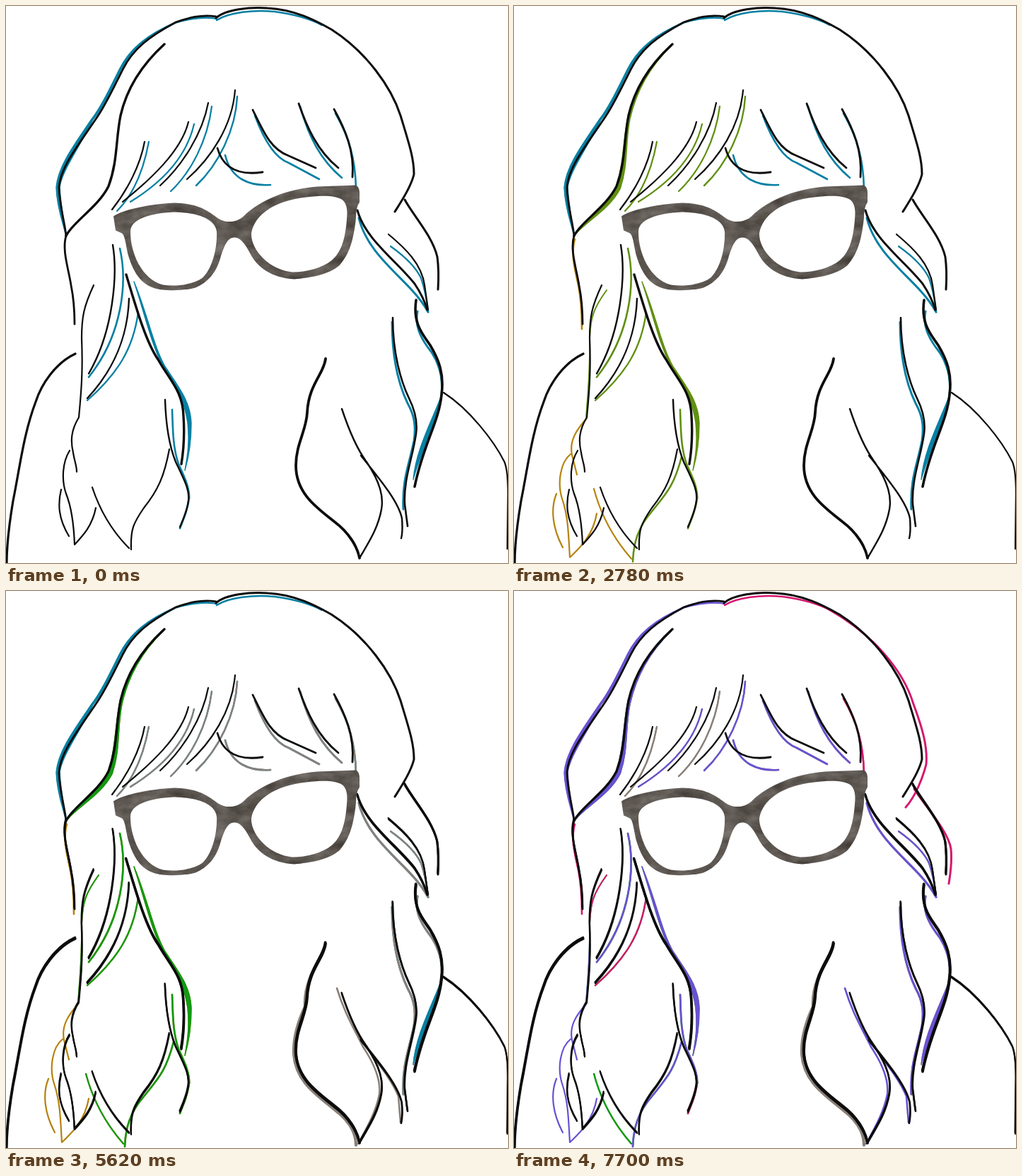
An HTML page without scripts for the animation above (8000 ms loop, 710 px wide and 788 px high).

```html
<!DOCTYPE html>
<html lang="en">
<head>
<meta charset="utf-8">
<title>Hair in changing colours</title>
<style>
  :root {
    --blue: #0780a3; --gold: #b5830f; --green: #129a12;
    --grey: #8a8078; --pink: #d6186f; --violet: #6a51d2;
    --olive: #609010; --none: transparent; --black: #0c0c0c;
  }
  html, body { margin: 0; width: 100%; height: 100%; overflow: hidden; background: #fff; }
  svg { display: block; width: 100%; height: 100%; }
  path { fill: none; stroke: currentColor; stroke-linecap: round; stroke-linejoin: round; }
  .full { fill: currentColor; stroke-width: 1.4; }

  /* Six held colours a to f; m is halfway between b and c */
  @keyframes tint {
    0%, 12.5% { color: var(--a); animation-timing-function: steps(10, jump-none); }
    20%, 31.75% { color: var(--b); animation-timing-function: steps(5, jump-none); }
    35.5% { color: var(--m); animation-timing-function: steps(5, start); }
    39.25%, 51% { color: var(--c); animation-timing-function: steps(10, jump-none); }
    58.5%, 70.25% { color: var(--d); animation-timing-function: steps(10, jump-none); }
    77.75%, 89.5% { color: var(--e); animation-timing-function: steps(10, jump-none); }
    97%, 100% { color: var(--f); }
  }
  .edge, .tints path, .bold { animation: tint 8s infinite; }
  .edge { filter: drop-shadow(.9px .5px 0); }

  .left { --a: var(--blue); --b: var(--gold); --m: var(--olive); --c: var(--green); }
  .late { --a: var(--none); --b: var(--gold); --m: var(--olive); --c: var(--green); }
  .slow { --a: var(--none); --b: var(--gold); --m: var(--gold); --c: var(--green); }
  .right { --a: var(--blue); --b: var(--blue); --m: var(--blue); --c: var(--green); }
  .calm { --a: var(--blue); --b: var(--blue); --m: var(--blue); --c: var(--blue); }
  .curl { --a: var(--none); --b: var(--gold); --m: var(--gold); --c: var(--gold); }
  .fresh { --a: var(--none); --b: var(--none); --m: var(--none); --c: var(--green); }
  .rim { --a: var(--none); --b: var(--none); --m: var(--none); --c: var(--none); }
  .d-blue { --d: var(--blue); } .d-gold { --d: var(--gold); } .d-green { --d: var(--green); }
  .d-grey { --d: var(--grey); } .d-none { --d: var(--none); }
  .e-blue { --e: var(--blue); } .e-gold { --e: var(--gold); } .e-green { --e: var(--green); }
  .e-grey { --e: var(--grey); } .e-pink { --e: var(--pink); }
  .f-green { --f: var(--green); } .f-grey { --f: var(--grey); }
  .f-pink { --f: var(--pink); } .f-violet { --f: var(--violet); }
  .lo { --a: var(--none); --b: var(--none); --m: var(--none); --c: var(--gold); }
  .bold { --a: var(--none); --b: var(--none); --m: var(--none);
    --c: var(--black); --d: var(--black); --e: var(--black); --f: var(--black); }
  .ink { color: var(--black); }
</style>
</head>
<body>
<svg viewBox="0 0 710 788" preserveAspectRatio="none">
  <defs>
    <filter id="wash" x="0" y="0" width="1" height="1" color-interpolation-filters="sRGB">
      <feTurbulence type="fractalNoise" baseFrequency=".035 .06" numOctaves="4" seed="8"/>
      <feColorMatrix values=".3 0 0 0 .215  .3 0 0 0 .19  .3 0 0 0 .17  0 0 0 0 1"/>
      <feComposite in2="SourceAlpha" operator="in"/>
    </filter>

    <g id="low">
      <path stroke-width="2.8" d="M85,325C79,345 88,370 92,395C96,415 97,432 97,450"/>
      <path stroke-width="3" d="M564,274C575,295 603,325 610,355C612,370 612,385 611,401"/>
      <path stroke-width="3.2" d="M98,492C70,505 50,535 42,560C25,605 20,650 10,700C5,730 1,760 1,788"/>
      <path stroke-width="2.2" d="M619,547C655,570 690,615 705,645C709,655 710,670 710,690L709,768"/>
      <path stroke-width="2.4" d="M151,338C158,380 152,460 117,520M174,414C172,470 152,515 115,555"/>
      <path stroke-width="3.4" d="M170,380C185,430 198,475 215,500C232,530 250,545 251,580C253,610 251,630 248,648"/>
      <path stroke-width="2.4" d="M225,557C226,590 230,620 240,645C252,670 260,685 258,700C256,715 251,725 246,737"/>
      <path stroke-width="2.2" d="M124,395C110,425 107,440 107,470C109,520 106,550 103,582C92,600 91,615 95,632C97,645 100,650 100,659
        M90,629C80,645 78,670 85,690C93,710 96,735 97,762C110,748 122,735 127,710
        M78,684C73,705 74,725 89,750"/>
      <path stroke-width="2.2" d="M122,681C130,705 145,738 174,767M231,627C224,665 215,685 195,710C180,732 176,740 177,769"/>
      <path stroke-width="3" d="M497,289C508,330 552,360 578,393C588,408 593,420 596,430"/>
      <path stroke-width="2.2" d="M541,323C565,343 588,365 592,395L597,430"/>
      <path stroke-width="3.6" d="M580,416C575,450 590,465 600,480C612,500 620,520 616,550C612,590 590,620 578,680"/>
      <path stroke-width="2.6" d="M547,441C547,490 558,530 570,555C580,575 582,590 580,605C575,640 562,670 564,705L568,736"/>
      <path stroke-width="3.8" d="M452,499C450,520 428,535 426,575C425,600 410,620 410,650C410,690 440,710 465,730C485,745 497,765 500,781"/>
      <path stroke-width="2.4" d="M475,570C485,600 495,625 510,645C530,675 534,695 531,712C526,740 512,760 500,781
        M502,636C525,665 555,700 560,725C561,738 561,745 559,753"/>
    </g>
  </defs>

  <g class="tints" stroke-width="2.6">
    <!-- crown -->
    <path class="calm d-blue e-pink f-violet full" stroke-width="2" d="M299,19C285,13 260,16 240,23C200,40 175,60 160,90C145,120 133,145 121,160C95,198 73,228 71,257C72,285 80,305 84,322C80,290 76,270 76,255C82,228 105,198 123,161C135,147 147,122 162,91C177,62 202,42 240,24C260,18 285,15 299,19Z"/>
    <path class="calm d-blue e-pink f-pink" d="M298,20C315,9 350,5 380,8C410,12 430,18 447,27"/>
    <path class="rim d-none e-pink f-pink" stroke-width="3" d="M447,27C505,60 550,110 565,160C578,195 585,220 583,245C578,265 568,290 554,306M566,280C578,300 615,340 618,365C620,385 617,400 615,414"/>
    <!-- loose curls -->
    <path class="curl d-gold e-gold f-pink" d="M86,330C80,350 86,372 91,395C95,415 96,432 96,457"/>
    <path class="curl d-gold e-pink f-violet" stroke-width="2.2" d="M103,583C88,600 78,615 82,635L89,663
      M80,634C66,645 60,675 69,700C77,725 77,750 79,780C94,766 112,748 117,718
      M60,690C51,712 55,740 69,766"/>

    <g class="edge lo d-gold e-green f-green">
      <path class="late d-green e-pink f-violet full" d="M222,57C190,88 172,125 164,160C157,195 162,225 150,259C135,288 102,305 88,322C98,303 130,283 145,255C155,225 154,190 161,157C169,123 188,87 222,57Z"/>
      <path class="left d-green e-green f-violet" d="M161,343C172,390 165,465 117,525"/>
      <path class="left d-green e-pink f-pink" stroke-width="2.3" d="M187,433C180,485 158,520 115,558"/>
      <path class="left d-green e-pink f-violet full" d="M181,390C200,435 208,480 225,510C245,540 261,560 262,590C262,620 258,640 253,657C256,640 260,620 257,590C252,555 240,540 222,510C205,477 196,435 181,390Z"/>
      <path class="left d-green e-pink f-violet" d="M235,571C236,600 236,625 244,648C252,665 260,682 259,697"/>
      <path class="left d-green e-pink f-pink" d="M259,695C257,715 251,725 246,739"/>
      <path class="late d-green e-pink f-pink" stroke-width="2" d="M131,402C113,427 108,440 107,470"/>
      <path class="late d-green e-pink f-violet" stroke-width="2" d="M107,470C108,520 104,550 102,584"/>
      <path class="slow d-green e-green f-green" stroke-width="2.2" d="M113,683C122,717 138,750 166,782"/>
      <path class="late d-green e-pink f-violet" d="M237,638C226,680 215,690 195,715C175,738 169,760 168,786"/>
    </g>

    <g class="edge rim d-blue e-blue f-grey">
      <!-- fringe -->
      <path class="left d-grey e-grey f-grey" stroke-width="2.2" d="M202,192C195,230 182,265 157,290"/>
      <path class="left d-grey e-pink f-violet" stroke-width="2.2" d="M266,167C255,215 220,250 176,277"/>
      <path class="left d-grey e-grey f-grey" stroke-width="2.2" d="M291,142C285,190 262,235 233,262"/>
      <path class="left d-grey e-grey f-violet" stroke-width="2.4" d="M327,128C325,175 300,225 269,254"/>
      <path class="right d-grey e-grey f-violet" d="M310,211C318,245 345,255 374,253"/>
      <path class="right d-grey e-pink f-violet" d="M352,155C365,190 380,215 400,222L443,245M416,142C428,185 445,218 475,243"/>
      <path class="right d-grey e-pink f-pink" d="M466,152C485,185 494,215 495,258"/>
      <!-- right locks -->
      <path class="right d-grey e-pink f-violet" stroke-width="3" d="M499,300C510,345 550,375 575,403C586,415 592,424 597,433"/>
      <path class="right d-grey e-grey f-violet" stroke-width="2.2" d="M544,340C565,355 580,370 587,385C592,400 595,415 597,432"/>
      <path class="calm d-grey e-grey f-violet" stroke-width="3" d="M582,432C577,455 590,475 602,490C615,510 618,530 616,550"/>
      <path class="calm d-blue e-blue f-violet full" d="M616,550C606,580 580,625 576,670C588,625 610,595 616,550Z"/>
      <path class="calm d-grey e-pink f-violet" stroke-width="3" d="M546,447C546,495 555,535 568,562C578,580 580,595 577,615C570,650 560,670 562,712"/>
    </g>

    <path class="fresh d-grey e-grey f-grey" stroke-width="4.2" d="M446,515C435,535 421,560 423,588C415,605 406,630 407,655C410,695 440,713 465,734C485,749 495,765 495,784"/>
    <path class="fresh d-grey e-pink f-violet" d="M468,562C478,595 490,615 505,645C525,675 530,695 528,712C523,738 510,760 498,782M498,630C520,660 545,690 555,715L558,752"/>
  </g>

  <g class="ink">
    <path stroke-width="2.8" d="M297,15C275,11 255,18 240,23C203,43 180,60 165,90C150,120 140,142 127,160C100,200 76,230 75,257C76,285 83,305 85,325"/>
    <path stroke-width="3" d="M297,17C310,5 345,1 370,3C410,5 440,22 460,33C510,65 545,115 558,155C570,195 577,215 577,238C573,255 560,275 550,291"/>
    <path stroke-width="3.4" d="M224,54C190,85 170,120 162,155C155,190 158,220 145,255C130,285 95,305 85,325"/>
    <path stroke-width="2.2" d="M196,192C190,225 172,260 150,288M258,164C248,205 205,245 165,277M286,137C278,180 250,225 218,254M324,119C320,170 290,215 256,245"/>
    <path stroke-width="2.8" d="M299,201C307,230 330,240 363,235M349,147C365,180 375,203 400,212L438,229M414,138C425,170 440,205 470,229M464,146C480,175 493,205 490,242"/>
    <use href="#low"/>
  </g>
  <use class="bold" href="#low" transform="translate(-.4 -1.8)"/>

  <path filter="url(#wash)" transform="translate(0 -.6)" style="stroke:none;fill:#5c544e" fill-rule="evenodd" d="M152,298C165,289 200,281 238,279C272,280 285,290 300,301C312,309 327,306 336,298C360,274 400,259 440,256L495,254Q500,257 500,265V278Q495,285 495,300C492,330 486,352 471,368C455,381 430,385 408,387C375,385 355,370 345,350C337,335 331,328 323,328C313,328 309,340 304,354C298,378 285,392 268,399C255,403 225,405 208,399C188,392 178,372 172,350C169,335 168,325 164,322L155,318Z
    M176,320C176,303 200,294 238,292C272,293 296,302 298,320C299,345 291,373 278,385C264,395 240,398 222,395C192,387 176,350 176,320Z
    M347,322C352,295 380,276 425,271C450,268 468,269 476,275C483,281 483,292 482,302C480,330 474,349 461,360C448,371 425,377 405,377C372,374 346,345 347,322Z"/>
</svg>
</body>
</html>
```
